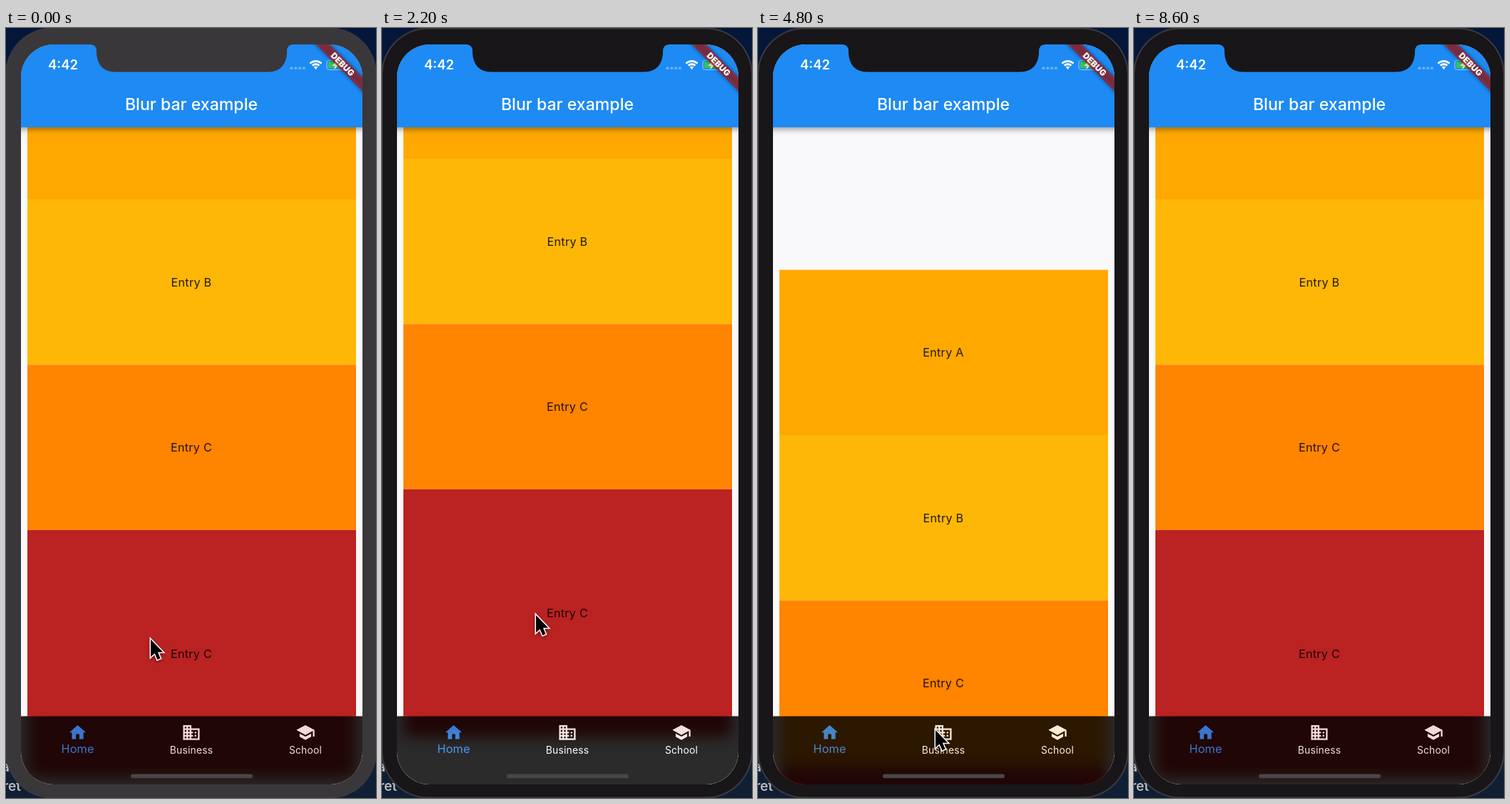
An HTML page with a canvas that plays this animation: 519x1078 px, repeating every 8700 ms.

```html
<!DOCTYPE html>
<html lang="en">
<head>
<meta charset="utf-8">
<title>Blur bar example</title>
<style>
html, body { margin: 0; width: 100%; height: 100%; overflow: hidden; background: #07172f; }
canvas { display: block; width: 519px; height: 1078px; }
</style>
</head>
<body>
<canvas id="stage"></canvas>
<script>
const W = 519, H = 1078, LOOP = 8700, STEP = 100;
const DP = 479 / 414;
const SCREEN = { x: 21, y: 23, w: 479, h: 1036, r: 46 };
const BAR_BOTTOM = 139, NAV_TOP = 963, NAV_ALPHA = 0.827;
const BLUE = '#1e8af3', PAGE = '#f9f8fb', FONT = 'Inter, Roboto, sans-serif';

const entries = [
  { label: 'Entry A', color: '#ffa800', h: 231.4 },
  { label: 'Entry B', color: '#ffb707', h: 231.4 },
  { label: 'Entry C', color: '#ff8400', h: 231.4 },
  { label: 'Entry C', color: '#bb2222', h: 347 }
];

const icons = {
  home: new Path2D('M10 20v-6h4v6h5v-8h3L12 3 2 12h3v8z'),
  business: new Path2D('M12 7V3H2v18h20V7H12zM6 19H4v-2h2v2zm0-4H4v-2h2v2zm0-4H4V9h2v2zm0-4H4V5h2v2zm4 12H8v-2h2v2zm0-4H8v-2h2v2zm0-4H8V9h2v2zm0-4H8V5h2v2zm10 12h-8v-2h2v-2h-2v-2h2v-2h-2V9h8v10zm-2-8h-2v2h2v-2zm0 4h-2v2h2v-2z'),
  school: new Path2D('M5 13.18v4L12 21l7-3.82v-4L12 17l-7-3.82zM12 3L1 9l11 6 9-4.91V17h2V9L12 3z')
};
const arrow = new Path2D('M0 0V24.5L5.6 19.4 9.4 28.2 13.6 26.4 9.9 17.8H17.2Z');
const bolt = new Path2D('M7 0L0 7H4L3 12 10 5H6Z');

// time, top edge of the second entry
const scrollKeys = [[0, 240], [1400, 126], [2200, 183], [3800, 397], [4800, 570], [6400, 534], [7300, 330], [8200, 240], [8700, 240]];
// time, x, y of the pointer tip
const pointerKeys = [[0, 203, 856], [1400, 224, 585], [2200, 216, 822], [3800, 239, 784], [4800, 249, 983], [6400, 242, 825], [7300, 232, 640], [8500, 229, 620]];
const POINTER_OFF = 8500;

const canvas = document.getElementById('stage');
const dpr = window.devicePixelRatio || 1;
canvas.width = W * dpr;
canvas.height = H * dpr;
const ctx = canvas.getContext('2d');

// list layer, extended past the stage so that its blur has no soft edges
const PAD = 60;
const list = document.createElement('canvas');
list.width = W + 2 * PAD;
list.height = H + 2 * PAD;
const lctx = list.getContext('2d');

// monotone cubic through the keys
function track(keys, t, col = 1) {
  const n = keys.length;
  let i = 0;
  while (i < n - 2 && t > keys[i + 1][0]) i++;
  const rate = k => (keys[k + 1][col] - keys[k][col]) / (keys[k + 1][0] - keys[k][0]);
  const slope = k => {
    if (k === 0 || k === n - 1) return 0;
    const a = rate(k - 1), b = rate(k);
    return a * b <= 0 ? 0 : 2 * a * b / (a + b);
  };
  const d = keys[i + 1][0] - keys[i][0];
  const u = Math.min(1, Math.max(0, (t - keys[i][0]) / d));
  const u2 = u * u, u3 = u2 * u;
  return (2 * u3 - 3 * u2 + 1) * keys[i][col] + (u3 - 2 * u2 + u) * d * slope(i)
    + (3 * u2 - 2 * u3) * keys[i + 1][col] + (u3 - u2) * d * slope(i + 1);
}

function text(c, str, x, y, size, color, weight = 400, spacing = 0, align = 'center') {
  c.font = `${weight} ${size}px ${FONT}`;
  c.letterSpacing = spacing + 'px';
  c.textAlign = align;
  c.textBaseline = 'alphabetic';
  c.fillStyle = color;
  c.fillText(str, x, y);
}

function rounded(x, y, w, h, r, color) {
  ctx.beginPath();
  ctx.roundRect(x, y, w, h, r);
  ctx.fillStyle = color;
  ctx.fill();
}

function drawList(top) {
  lctx.setTransform(1, 0, 0, 1, PAD, PAD);
  lctx.fillStyle = PAGE;
  lctx.fillRect(-PAD, -PAD, list.width, list.height);
  let y = top - entries[0].h;
  for (const e of entries) {
    lctx.fillStyle = e.color;
    lctx.fillRect(30, y, 461, e.h);
    text(lctx, e.label, 260, y + e.h / 2 + 6, 14 * DP, 'rgba(0,0,0,.87)', 400, 0.25);
    y += e.h;
  }
}

function drawBackdrop() {
  const g = ctx.createLinearGradient(0, 0, 0, H);
  g.addColorStop(0, '#04173a');
  g.addColorStop(1, '#101f33');
  ctx.fillStyle = g;
  ctx.fillRect(0, 0, W, H);
  text(ctx, 'a', 5, 1041, 19, '#b9bcc2', 600, 0, 'right');
  text(ctx, 'ret', 21, 1068, 19, '#b9bcc2', 600, 0, 'right');
}

function drawBody(shade) {
  rounded(-1, -0.5, 521, 1079, 66, '#3b3a3d');
  rounded(1, 1.5, 517, 1075, 64, shade);
}

function drawAppBar() {
  ctx.save();
  ctx.shadowColor = 'rgba(0,0,0,.38)';
  ctx.shadowBlur = 8 * dpr;
  ctx.shadowOffsetY = 2.5 * dpr;
  ctx.fillStyle = BLUE;
  ctx.fillRect(0, SCREEN.y, W, BAR_BOTTOM - SCREEN.y);
  ctx.restore();
  text(ctx, 'Blur bar example', 260, 115, 20 * DP, '#fff', 500);
}

function drawNotch(shade) {
  ctx.beginPath();
  ctx.moveTo(116, 22);
  ctx.lineTo(118, 23);
  ctx.quadraticCurveTo(127, 23, 127, 33);
  ctx.bezierCurveTo(127, 50, 136, 61.5, 153, 61.5);
  ctx.lineTo(368, 61.5);
  ctx.bezierCurveTo(385, 61.5, 394, 50, 394, 33);
  ctx.quadraticCurveTo(394, 23, 403, 23);
  ctx.lineTo(405, 22);
  ctx.fillStyle = shade;
  ctx.fill();
}

function drawStatus() {
  text(ctx, '4:42', 80, 58, 18.5, '#fff', 600);
  ctx.fillStyle = 'rgba(255,255,255,.35)';
  for (let i = 0; i < 4; i++) {
    ctx.beginPath();
    ctx.arc(400.5 + i * 5.8, 56.3, 2, 0, 7);
    ctx.fill();
  }
  // wifi
  ctx.strokeStyle = ctx.fillStyle = '#fff';
  ctx.lineWidth = 2.7;
  const from = -Math.PI * 0.75, to = -Math.PI * 0.25;
  for (const r of [6.9, 11.2]) {
    ctx.beginPath();
    ctx.arc(434.5, 57.5, r, from, to);
    ctx.stroke();
  }
  ctx.beginPath();
  ctx.moveTo(434.5, 58.2);
  ctx.arc(434.5, 57.5, 3.8, from, to);
  ctx.fill();
  // battery
  ctx.beginPath();
  ctx.roundRect(450, 45, 25, 13.5, 3.8);
  ctx.strokeStyle = 'rgba(255,255,255,.5)';
  ctx.lineWidth = 1.2;
  ctx.stroke();
  rounded(452, 47, 21, 9.5, 2.2, '#35c759');
  ctx.save();
  ctx.translate(457.5, 45.7);
  ctx.fillStyle = '#fff';
  ctx.fill(bolt);
  ctx.restore();
}

function drawBanner() {
  const top = 28 * DP, h = 12 * DP, half = 40 * DP;
  ctx.save();
  ctx.translate(SCREEN.x + SCREEN.w, SCREEN.y);
  ctx.rotate(Math.PI / 4);
  ctx.filter = `blur(${2.5 * dpr}px)`;
  ctx.fillStyle = 'rgba(0,0,0,.5)';
  ctx.fillRect(-half - 20, top, 2 * half + 40, h);
  ctx.filter = 'none';
  ctx.fillStyle = 'rgba(183,28,28,.63)';
  ctx.fillRect(-half - 20, top, 2 * half + 40, h);
  text(ctx, 'DEBUG', 0, top + h / 2 + 4.2, 10.2 * DP, '#fff', 900);
  ctx.restore();
}

function navItem(icon, label, x, size, base, color) {
  ctx.save();
  ctx.translate(x - 12 * DP, 986.3 - 12 * DP);
  ctx.scale(DP, DP);
  ctx.fillStyle = color;
  ctx.fill(icons[icon], 'evenodd');
  ctx.restore();
  text(ctx, label, x, base, size, color, 400, 0.2);
}

function drawNav() {
  ctx.save();
  ctx.beginPath();
  ctx.rect(0, NAV_TOP + 0.5, W, H);
  ctx.clip();
  ctx.filter = `blur(${10 * dpr}px)`;
  ctx.drawImage(list, -PAD, -PAD);
  ctx.filter = 'none';
  ctx.globalAlpha = NAV_ALPHA;
  ctx.fillStyle = '#000';
  ctx.fillRect(0, NAV_TOP, W, H - NAV_TOP);
  // additive, so the bar and its items fade as one layer
  ctx.globalCompositeOperation = 'lighter';
  navItem('home', 'Home', 100.5, 14 * DP, 1015, '#1e88ee');
  navItem('business', 'Business', 260, 12 * DP, 1015.5, '#fff');
  navItem('school', 'School', 420, 12 * DP, 1015.5, '#fff');
  ctx.restore();
  rounded(175, 1044.5, 171, 5.8, 2.9, '#494648');
}

function drawPointer(x, y) {
  ctx.save();
  ctx.translate(x, y);
  ctx.lineJoin = 'miter';
  ctx.shadowColor = 'rgba(0,0,0,.4)';
  ctx.shadowBlur = 4 * dpr;
  ctx.shadowOffsetY = 1.5 * dpr;
  ctx.strokeStyle = '#fff';
  ctx.lineWidth = 3;
  ctx.stroke(arrow);
  ctx.shadowColor = 'transparent';
  ctx.fillStyle = '#000';
  ctx.fill(arrow);
  ctx.restore();
}

function draw(t) {
  const fade = Math.min(1, t / 1000);
  const level = a => Math.round(a[0] + (a[1] - a[0]) * fade);
  const shade = `rgb(${level([57, 24])},${level([55, 22])},${level([57, 24])})`;

  ctx.setTransform(dpr, 0, 0, dpr, 0, 0);
  drawBackdrop();
  drawBody(shade);
  drawList(track(scrollKeys, t));

  ctx.save();
  ctx.beginPath();
  ctx.roundRect(SCREEN.x, SCREEN.y, SCREEN.w, SCREEN.h, SCREEN.r);
  ctx.clip();
  ctx.drawImage(list, -PAD, -PAD);
  drawAppBar();
  drawStatus();
  drawNotch(shade);
  drawNav();
  drawBanner();
  ctx.restore();

  if (t < POINTER_OFF) drawPointer(track(pointerKeys, t, 1), track(pointerKeys, t, 2));
}

const start = performance.now();
function tick(now) {
  const t = Math.max(0, now - start) % LOOP;
  draw(Math.floor(t / STEP) * STEP);
  requestAnimationFrame(tick);
}
draw(0);
requestAnimationFrame(tick);
</script>
</body>
</html>
```
